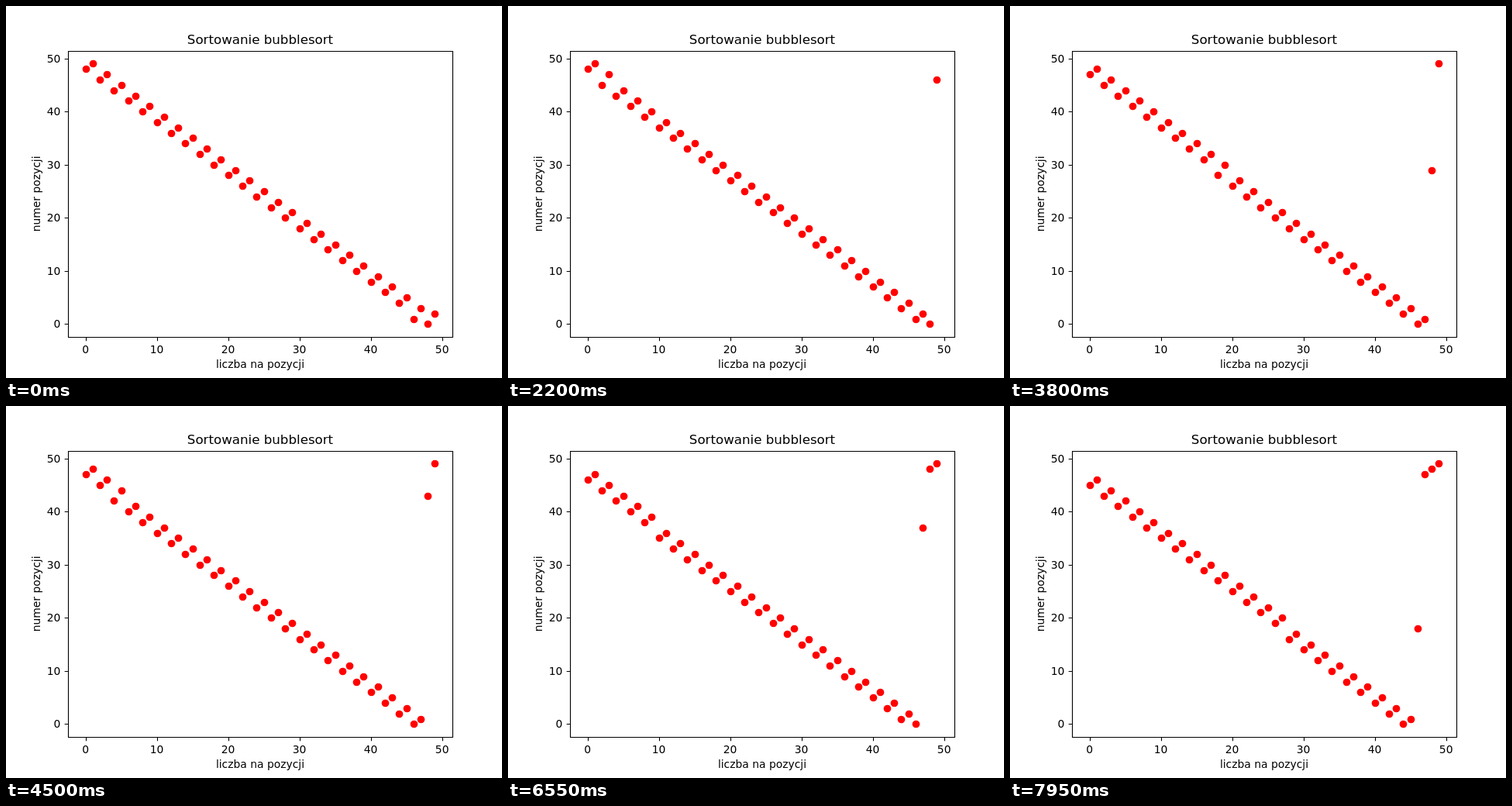
These frames come from a looping animation (640x480 px, 8 s). An HTML page:

```html
<!DOCTYPE html>
<html lang="pl">
<head>
<meta charset="utf-8">
<title>Sortowanie bubblesort</title>
<style>
  html, body { margin: 0; width: 100%; height: 100%; overflow: hidden; background: #fff; }
  svg { display: block; width: 640px; height: 480px; }
  text { font: 13.89px "DejaVu Sans", sans-serif; text-anchor: middle; }
  .title { font-size: 16.67px; }
  .tick-y { text-anchor: end; }
  path { fill: none; stroke: #000; stroke-width: 1.11; }
  circle { fill: #f00; }
</style>
</head>
<body>
<svg viewBox="0 0 640 480">
  <g id="dots"></g>
  <g id="ticks"></g>
  <path d="M80.5 58.5H576.5V427.5H80.5Z"/>
  <text class="title" x="328" y="49">Sortowanie bubblesort</text>
  <text x="328" y="467">liczba na pozycji</text>
  <text transform="translate(44 242.4) rotate(-90)">numer pozycji</text>
</svg>
<script>
const COUNT = 50, STEP_MS = 50, STEPS = 160;

const plotX = value => 102.55 + value * 496 / 53.9;
const plotY = index => 410.4 - index * 369.6 / 53.9;
const snap = v => Math.round(v) + 0.5;

function add(parent, tag, attrs, text = '') {
  const node = document.createElementNS('http://www.w3.org/2000/svg', tag);
  for (const key in attrs) node.setAttribute(key, attrs[key]);
  node.textContent = text;
  return document.getElementById(parent).appendChild(node);
}

for (let n = 0; n <= 50; n += 10) {
  const x = plotX(n), y = plotY(n);
  add('ticks', 'path', { d: `M${snap(x)} 427.5v4.86M80.5 ${snap(y)}h-4.86` });
  add('ticks', 'text', { x, y: 448 }, n);
  add('ticks', 'text', { x: 70.3, y: Math.round(y + 5), class: 'tick-y' }, n);
}

// One state of the list is kept after every swap of the bubble sort.
function sortStates() {
  // Descending pairs: 48, 49, 46, 47, ..., 0, 1
  const list = Array.from({ length: COUNT }, (_, i) => COUNT - 2 - i + 2 * (i % 2));
  const states = [];
  for (let end = COUNT - 1; end > 0; end--) {
    for (let i = 0; i < end; i++) {
      if (list[i] <= list[i + 1]) continue;
      [list[i], list[i + 1]] = [list[i + 1], list[i]];
      states.push([...list]);
      if (states.length === STEPS) return states;
    }
  }
}

const states = sortStates();
const dots = Array.from({ length: COUNT }, (_, value) =>
  add('dots', 'circle', { cx: snap(plotX(value)), r: 4.86 }));

const start = performance.now();
function draw() {
  const step = Math.floor((performance.now() - start) / STEP_MS) % STEPS;
  states[step].forEach((value, index) => dots[value].setAttribute('cy', snap(plotY(index))));
  requestAnimationFrame(draw);
}
draw();
</script>
</body>
</html>
```
